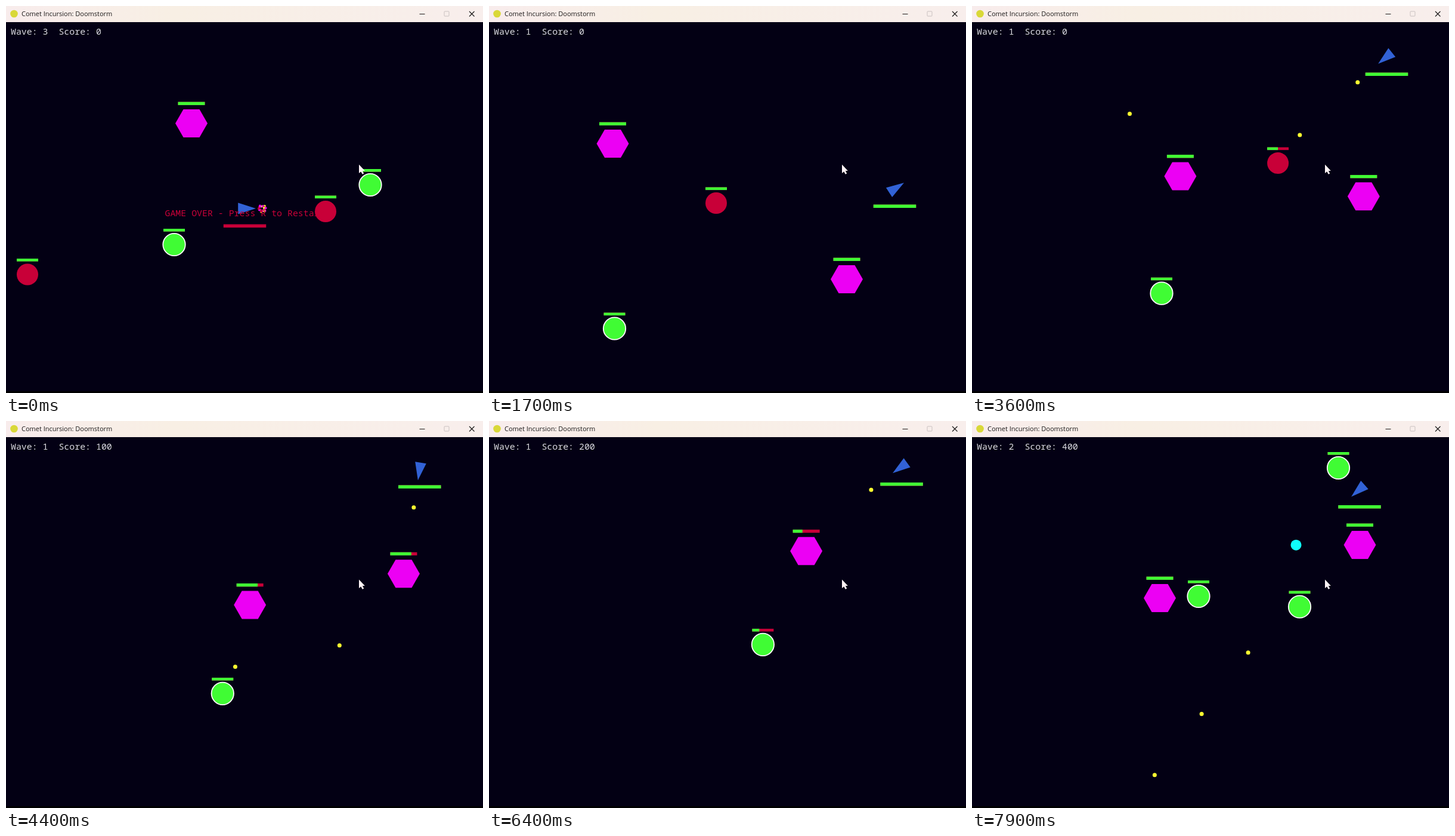
Write an HTML page that moves like this. It is 800 px wide and 648 px high and loops after 8 s.

```html
<!DOCTYPE html>
<html lang="en">
<head>
<meta charset="utf-8">
<title>Comet Incursion: Doomstorm</title>
<style>
  html, body { margin: 0; width: 100%; height: 100%; overflow: hidden; background: #030014; }
  svg { display: block; width: 800px; height: 648px; }
  .hud { font: 14.9px "Noto Sans Mono", "DejaVu Sans Mono", monospace; white-space: pre; }
  .title { font: 11px "Open Sans", "Noto Sans", sans-serif; fill: #1c1a1a; }
</style>
</head>
<body>
<svg viewBox="0 0 800 648">
  <defs>
    <linearGradient id="bar">
      <stop offset="0" stop-color="#f8ecec"/>
      <stop offset=".35" stop-color="#f8efe4"/>
      <stop offset="1" stop-color="#f8eeec"/>
    </linearGradient>
  </defs>
  <rect width="800" height="648" fill="#030014"/>
  <g id="game"></g>
  <path d="M592 265.5v14.5l3.2-2.8 2.6 4.6 2.4-1.2-2.3-4.6h4z" fill="#fff4f6"/>
  <rect y="645" width="800" height="3" fill="#000"/>
  <rect width="800" height="27" fill="url(#bar)"/>
  <circle cx="13.5" cy="13" r="6.3" fill="#d9d838"/>
  <text class="title" x="26" y="17">Comet Incursion: Doomstorm</text>
  <g fill="none" stroke="#1c1a1a">
    <path d="M693.5 13.5h9"/>
    <rect x="735" y="9" width="8" height="8" rx="1" stroke="#c9c1c0"/>
    <path d="M777 9l8.5 8.5m0-8.5l-8.5 8.5" stroke-width="1.2"/>
  </g>
</svg>
<script>
const LOOP = 8000, FRAME = 100, DT = 10, RESTART = 100;
const FIRST_SHOT = 2930, SHOT_GAP = 200, BULLET_SPEED = 0.645, NOSE = 19, HIT_DISTANCE = 18;
const RED = '#c80038', GREEN = '#40fc34', MAGENTA = '#ec00f4', YELLOW = '#fcfc30', BLUE = '#3262d6', CYAN = '#10fcfc';

// Speeds in px/ms; a foe within range turns to chase the ship
const kinds = {
  hex: { speed: 0.08, range: 357, damage: 0.214, bar: 45, thick: 5.3, lift: 35.9 },
  red: { speed: 0.08, range: 446, damage: 1 / 2, bar: 36, thick: 4.6, lift: 26.5 },
  green: { speed: 0.0645, range: 443, damage: 1 / 3, bar: 36, thick: 4.6, lift: 26.5 }
};

// Foes drift along their heading and pass (x, y) at the time `at`; chasing starts after it
const foe = (kind, x, y, heading = 0, loot = false) => ({ kind, x, y, heading, loot });
const waves = [
  { number: 3, from: 0, at: 0, foes: [
    foe('hex', 311, 196.5), foe('green', 611, 299.5), foe('red', 536, 344),
    foe('green', 282, 399.5), foe('red', 36, 449.5)] },
  { number: 1, from: RESTART, at: 1700, foes: [
    foe('hex', 207.5, 230.5, 21, true), foe('hex', 600, 457.5, -66),
    foe('red', 381, 330, -1), foe('green', 210.5, 540, -28.7)] },
  { number: 2, from: 7200, at: 7900, foes: [
    foe('green', 614.5, 78.5, 0), foe('hex', 650.5, 207.5, -73), foe('hex', 315, 296.5, -18),
    foe('green', 380, 293.5, -35), foe('green', 549.5, 311, -59)] }
];

// One sign per shot: the foe it strikes, or - for a miss
const shotTargets = '-220--11111-330000-3---';

const course = [
  [RESTART, 400.5, 339], [900, 638, 330], [1700, 680.5, 306], [2200, 764, 235], [2900, 712.5, 121.5],
  [3200, 702, 99], [3600, 695.5, 85], [5200, 692, 77], [7600, 692, 76], [7900, 650, 114.5]
];
const turns = [
  [400, 0], [1300, -33], [1700, -33], [2900, -180], [3050, -219], [3650, -219], [4100, -261],
  [4950, -261], [5200, -232], [5500, -232], [6400, -216], [6700, -233], [7600, -234], [7900, -221.5]
];

const radians = degrees => degrees * Math.PI / 180;
const distance = (a, b) => Math.hypot(a.x - b.x, a.y - b.y);
const random = n => { const v = Math.sin(n * 127.1 + 3.7) * 43758.5453; return v - Math.floor(v); };

// Piecewise linear interpolation, clamped at both ends
function along(keys, t) {
  const i = keys.findIndex(k => k[0] > t);
  if (i === 0) return keys[0].slice(1);
  if (i < 0) return keys[keys.length - 1].slice(1);
  const a = keys[i - 1], b = keys[i], p = (t - a[0]) / (b[0] - a[0]);
  return a.slice(1).map((v, j) => v + (b[j + 1] - v) * p);
}

function shipAt(t) {
  const [x, y] = along(course, t), [heading] = along(turns, t);
  return { x, y, heading };
}

function advance(point, angle, length) {
  return { x: point.x + Math.cos(angle) * length, y: point.y + Math.sin(angle) * length };
}

const rect = (x, y, w, h, fill) => `<rect x="${x}" y="${y}" width="${w}" height="${h}" fill="${fill}"/>`;
const disc = ({ x, y }, r, fill, extra = '') => `<circle cx="${x}" cy="${y}" r="${r}" fill="${fill}" ${extra}/>`;
const text = (x, y, fill, content) => `<text class="hud" x="${x}" y="${y}" fill="${fill}">${content}</text>`;
const healthBar = (x, y, w, h, health) =>
  rect(x - w / 2, y, w, h, RED) + rect(x - w / 2, y, w * health, h, GREEN);

function drawShip({ x, y, heading }, health) {
  return `<path d="M18.5 0L-11.3 9.4V-9.4Z" fill="${BLUE}" transform="translate(${x} ${y}) rotate(${heading})"/>`
    + healthBar(x, y + 26.5, 71.5, 5.5, health);
}

function drawFoe(f) {
  const { bar, thick, lift } = kinds[f.kind];
  const body = f.kind === 'hex'
    ? `<path d="M-27 0L-13.5-23.5H13.5L27 0L13.5 23.5H-13.5Z" fill="${MAGENTA}" transform="translate(${f.x} ${f.y})"/>`
    : f.kind === 'red' ? disc(f, 18, RED) : disc(f, 18.7, GREEN, 'stroke="#fff" stroke-width="1.8"');
  return body + healthBar(f.x, f.y - lift, bar, thick, f.health);
}

function drawBurst(center, age) {
  if (age > 500) return '';
  const colors = [RED, MAGENTA, RED, YELLOW, MAGENTA];
  return Array.from({ length: 24 }, (_, i) => {
    const angle = (i + random(i)) / 24 * 2 * Math.PI, speed = 0.17 + 0.21 * random(i + 50);
    return disc(advance(center, angle, speed * age), 1.9, colors[Math.floor(random(i + 90) * 5)]);
  }).join('');
}

const bulletAt = (b, t) => advance(b.origin, b.angle, NOSE + BULLET_SPEED * (t - b.fired));

function startWave({ from, at, foes }) {
  return foes.map(f => {
    const start = advance(f, radians(f.heading), kinds[f.kind].speed * (from - at));
    return { ...f, ...start, at, health: 1 };
  });
}

function moveFoe(f, ship, t) {
  const { speed, range } = kinds[f.kind];
  const chasing = t >= f.at && distance(f, ship) < range;
  const angle = chasing ? Math.atan2(ship.y - f.y, ship.x - f.x) : radians(f.heading);
  Object.assign(f, advance(f, angle, speed * DT));
}

// Plays the game once and returns the picture of every frame
function simulate() {
  const frames = [], bursts = [], loot = [];
  let wave, foes, bullets = [];

  for (let t = 0; t < LOOP; t += DT) {
    const ship = shipAt(t), over = t < RESTART;
    const next = waves.find(w => w.from === t);
    if (next) foes = startWave(wave = next);

    const shot = (t - FIRST_SHOT) / SHOT_GAP;
    if (shotTargets[shot]) {
      bullets.push({ origin: ship, angle: radians(ship.heading), fired: t, target: foes[shotTargets[shot]] });
    }
    bullets = bullets.filter(({ origin, fired, target }) => {
      if (!target || NOSE + BULLET_SPEED * (t - fired) < distance(origin, target) - HIT_DISTANCE) return true;
      target.health -= kinds[target.kind].damage;
      if (target.health < 0.01) {
        bursts.push({ x: target.x, y: target.y, born: t });
        if (target.loot) loot.push({ x: target.x, y: target.y });
      }
      return false;
    });

    if (t % FRAME === 0) {
      frames.push(drawShip(ship, over ? 0 : 1)
        + bullets.map(b => disc(bulletAt(b, t), 3.5, YELLOW)).join('')
        + foes.filter(f => f.health > 0.01).map(drawFoe).join('')
        + loot.map(l => disc(l, 9, CYAN)).join('')
        + bursts.map(b => drawBurst(b, t - b.born)).join('')
        + (over ? drawBurst({ x: 430, y: 339 }, 17)
          + text(266.5, 351.5, RED, 'GAME OVER - Press R to Restart') : '')
        + text(8, 48, '#dcdce0', `Wave: ${wave.number}  Score: ${bursts.length * 100}`));
    }
    foes.forEach(f => moveFoe(f, ship, t));
  }
  return frames;
}

const game = document.getElementById('game');
const frames = simulate();
const start = performance.now();
let shown = -1;
function tick() {
  const n = Math.floor((performance.now() - start) % LOOP / FRAME);
  if (n !== shown) game.innerHTML = frames[shown = n];
  requestAnimationFrame(tick);
}
tick();
</script>
</body>
</html>
```
